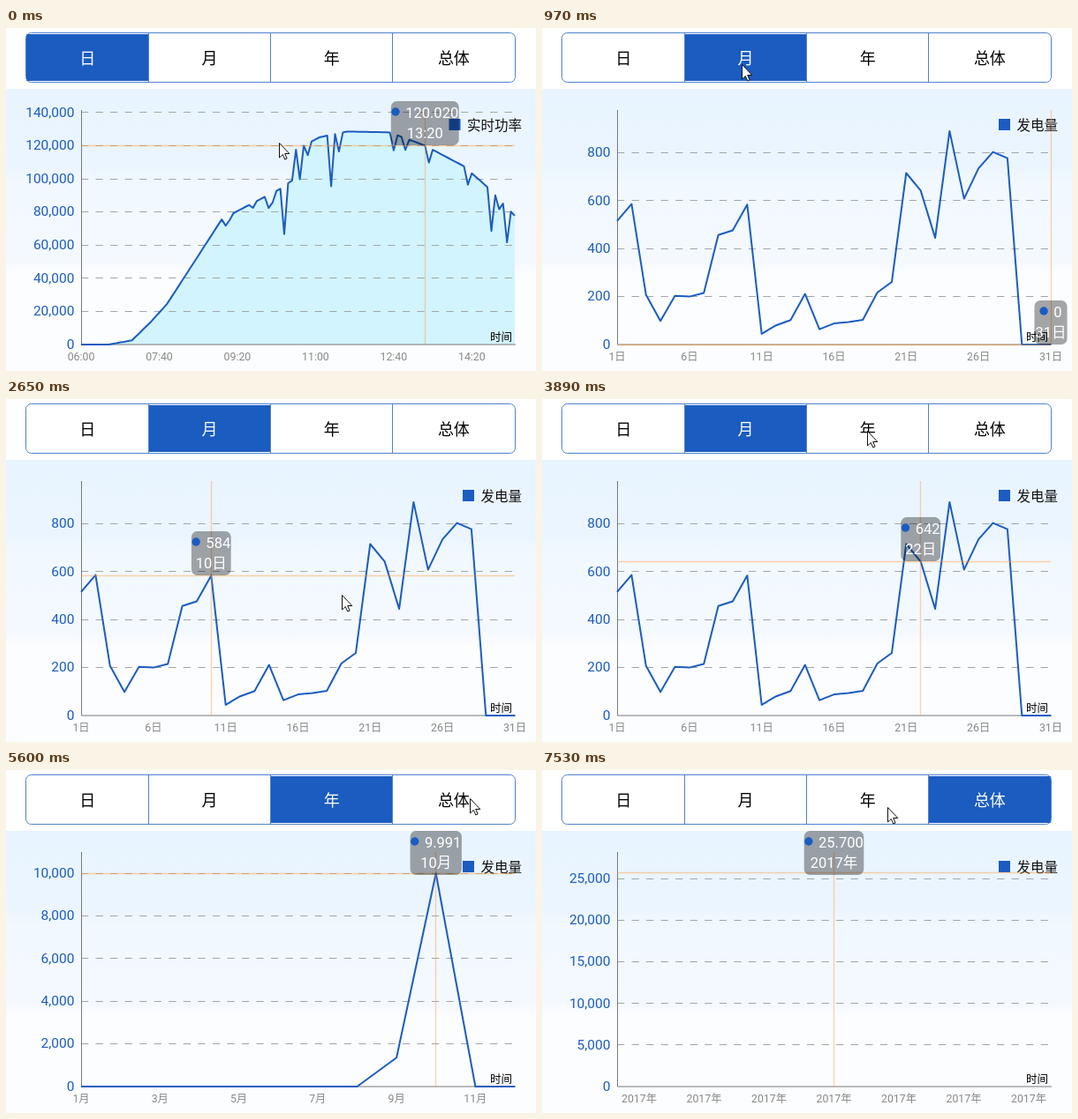
Write an HTML page that moves like this. It is 600 px wide and 389 px high and loops after 8000 ms.

```html
<!DOCTYPE html>
<html lang="zh-CN">
<head>
<meta charset="utf-8">
<title>Power chart</title>
<style>
  html, body { margin: 0; width: 100%; height: 100%; overflow: hidden; background: #fff; }
  svg { display: block; width: 600px; height: 389px; font-family: Roboto, "Noto Sans CJK SC", "Noto Sans CJK", sans-serif; }
  .tab { font-size: 18px; font-weight: 500; text-anchor: middle; }
  .y { font-size: 15.5px; text-anchor: end; fill: #1b5cc1; }
  .x { font-size: 12.3px; text-anchor: middle; fill: #888; }
  .unit { font-size: 12.5px; font-weight: 500; text-anchor: end; }
  .legend { font-size: 15.5px; font-weight: 500; text-anchor: end; fill: #111; }
  .tip { font-size: 16.5px; fill: #fff; }
  .border { stroke: #4f82d0; fill: none; }
  .grid { stroke: #a0a5aa; stroke-dasharray: 8.27; }
  .axis { stroke: #777; fill: none; }
  .line { stroke: #1b5cc1; stroke-width: 2; fill: none; stroke-linejoin: round; }
  .cross { stroke: #f93; stroke-width: 1.4; opacity: .42; fill: none; }
</style>
</head>
<body>
<svg viewBox="0 0 600 389">
  <defs>
    <linearGradient id="sky" x2="0" y2="1">
      <stop stop-color="#e8f4ff"/>
      <stop offset=".27" stop-color="#ebf5ff"/>
      <stop offset=".33" stop-color="#f1f8ff"/>
      <stop offset=".61" stop-color="#f4f9ff"/>
      <stop offset=".66" stop-color="#fcfdff"/>
    </linearGradient>
  </defs>
  <rect y="69" width="600" height="320" fill="url(#sky)"/>
  <g id="tabs"></g>
  <g id="chart"></g>
  <path id="cursor" d="M.5 .5V17L4.3 13.5L6.8 19L9.1 18L6.7 12.5H11.8Z" fill="#fff" stroke="#111"/>
</svg>
<script>
const LOOP = 8000, STEP = 140, LEFT = 85, RIGHT = 576, TOP = 93, BASE = 359, BLUE = '#1b5cc1';
const $ = id => document.getElementById(id);
const text = (cls, x, y, s, extra = '') => `<text class="${cls}" x="${x}" y="${y}" ${extra}>${s}</text>`;
const times = (n, f) => Array.from({ length: n }, (_, i) => f(i));

function lerpKeys(keys, i) {
  const n = Math.max(1, keys.findIndex(k => k[0] >= i));
  const [a, u] = keys[n - 1], [b, v] = keys[n];
  return u + (v - u) * (i - a) / (b - a);
}

// The day's trend in thousands, one index per five minutes, and the drops caused by clouds
const trend = [
  [0, 0], [7, 0], [13, 2.5], [18, 14], [22, 24.5], [36, 75.5], [42, 83], [51, 94], [54, 99], [55, 117.5],
  [61, 125], [68, 128.5], [79, 128], [88, 120.02], [98, 107.5], [104, 95], [111, 77.7]];
const clouds = {
  37: 5, 38: 3, 44: 3, 48: 8, 49: 6, 52: 29, 56: 19, 58: 7, 64: 31, 66: 11,
  80: 10, 83: 7, 89: 9, 99: 9, 105: 24, 107: 6, 109: 21
};

// scale: pixels per unit; step: value between grid lines; every: points between labels
const day = {
  data: times(112, i => 1000 * (lerpKeys(trend, i) - (clouds[i] || 0))),
  name: i => [6 + Math.floor(i / 12), i % 12 * 5].map(n => String(n).padStart(2, 0)).join(':'),
  scale: .00188, step: 20000, rows: 7, every: 20, legend: '实时功率', area: true
};
const month = {
  data: [515, 586, 208, 98, 203, 200, 215, 457, 476, 584, 45, 80, 102, 211, 64, 88,
    94, 103, 217, 261, 715, 642, 445, 890, 608, 735, 803, 777, 0, 0, 0],
  name: i => i + 1 + '日',
  scale: .272, step: 200, rows: 4, every: 5, legend: '发电量'
};
const year = {
  data: times(12, i => ({ 8: 1350, 9: 9991 })[i] || 0),
  name: i => i + 1 + '月',
  scale: .0242, step: 2000, rows: 5, every: 2, legend: '发电量'
};
const total = {
  data: times(7, () => 25700),
  name: () => '2017年',
  scale: .00943, step: 5000, rows: 5, every: 1, legend: '发电量', pad: 25, hidden: true
};

// start time, selected tab, chart, marked point
const states = [
  [0, 0, day, 88],
  [820, 1, day, 88],
  [970, 1, month, 30],
  [2650, 1, month, 9],
  [3220, 1, month, 21],
  [4170, 2, month, 21],
  [4320, 2, year, 11],
  [5090, 2, year, 9],
  [5870, 3, year, 9],
  [6010, 3, total, 3]];

// Cursor moves: time of first and last step, goal x and y
const moves = [
  [150, 540, 226, 41],
  [1270, 1790, 266, 165],
  [1920, 2190, 248, 250],
  [2340, 2340, 229, 250],
  [2650, 2650, 380, 222],
  [2790, 2940, 428, 215],
  [3220, 3890, 368, 36],
  [4320, 4780, 478, 234],
  [5090, 5600, 525, 32],
  [6010, 6150, 402, 237],
  [6580, 6730, 494, 265],
  [7010, 7530, 391, 42]];

function drawTabs(active) {
  const edge = i => 23 + 138.25 * i;
  $('tabs').innerHTML =
    '<rect x="22.5" y="5.5" width="554" height="56" rx="6" fill="#fff"/>' +
    `<rect x="${edge(active)}" y="7" width="138.25" height="53" fill="${BLUE}"/>` +
    '<rect class="border" x="22.5" y="5.5" width="554" height="56" rx="6"/>' +
    [1, 2, 3].map(i => `<path class="border" d="M${Math.floor(edge(i)) + .5} 6V61"/>`).join('') +
    ['日', '月', '年', '总体'].map((s, i) =>
      text('tab', edge(i + .5), 40.5, s, `fill="${i === active ? '#fff' : '#000'}"`)).join('');
}

function textWidth(s) {
  return [...s].reduce((w, c) => w + 16.5 * (c === '.' || c === ':' ? .26 : c > '~' ? 1 : .5615), 0);
}

function drawTip(x, y, value, label) {
  const w = 16 + textWidth(value), box = Math.max(w + 1, textWidth(label) + 2);
  const top = Math.max(69, Math.round(y) - 50);
  const crossX = Math.floor(x) + .5, crossY = Math.floor(y) + .5;
  return `<path class="cross" d="M${LEFT} ${crossY}H${RIGHT}M${crossX} ${TOP}V${BASE}"/>` +
    `<rect x="${x - box / 2}" y="${top}" width="${box}" height="50" rx="6.5" fill="#000" opacity=".35"/>` +
    `<circle cx="${x - w / 2 + 4.7}" cy="${top + 12}" r="4.7" fill="${BLUE}"/>` +
    text('tip', x + w / 2, top + 19, value, 'text-anchor="end"') +
    text('tip', x, top + 41.5, label, 'text-anchor="middle"');
}

function drawChart(c, mark) {
  const { data, pad = 0 } = c;
  const px = i => LEFT + pad + (RIGHT - LEFT - 2 * pad) * i / (data.length - 1);
  const py = i => BASE - data[i] * c.scale;
  const path = 'M' + data.map((_, i) => px(i).toFixed(1) + ' ' + py(i).toFixed(1)).join('L');
  let s = c.area ? `<path d="${path}V${BASE}H${LEFT}Z" fill="#d2f4fe"/>` : '';
  for (let i = 0; i <= c.rows; i++) {
    const y = BASE - i * c.step * c.scale;
    if (i) s += `<path class="grid" d="M${LEFT} ${Math.floor(y) + .5}H${RIGHT}"/>`;
    s += text('y', 77.5, y + 4.8, (i * c.step).toLocaleString('en-US'));
  }
  s += `<path class="axis" d="M85.5 ${TOP}V${BASE}H577"/>`;
  if (!c.hidden) s += `<path class="line" d="${path}"/>`;
  for (let i = 0; i < data.length; i += c.every) s += text('x', px(i), 377, c.name(i));
  s += text('unit', 573, 355, '时间') + text('legend', 584, 115.7, c.legend);
  s += `<rect x="${563.5 - c.legend.length * 15.5}" y="103" width="13" height="13" fill="${BLUE}"/>`;
  const value = Math.round(data[mark]).toLocaleString('en-US').replace(',', '.');
  $('chart').innerHTML = s + drawTip(px(mark), py(mark), value, c.name(mark));
}

function cursorAt(t) {
  let x = 309, y = 130;
  for (const [from, to, gx, gy] of moves) {
    if (t < from) break;
    const gaps = Math.round((to - from) / STEP);
    const done = t >= to ? gaps : Math.floor((t - from) / (to - from) * gaps + 1e-6);
    const k = (done + 1) / (gaps + 1);
    x += (gx - x) * k;
    y += (gy - y) * k;
  }
  return [x, y];
}

let shown, start;
function frame(now) {
  start ??= now;
  const t = (now - start) % LOOP;
  const state = states.findLast(s => s[0] <= t);
  if (state !== shown) {
    drawTabs(state[1]);
    drawChart(state[2], state[3]);
    shown = state;
  }
  $('cursor').setAttribute('transform', `translate(${cursorAt(t)})`);
  requestAnimationFrame(frame);
}
requestAnimationFrame(frame);
</script>
</body>
</html>
```
